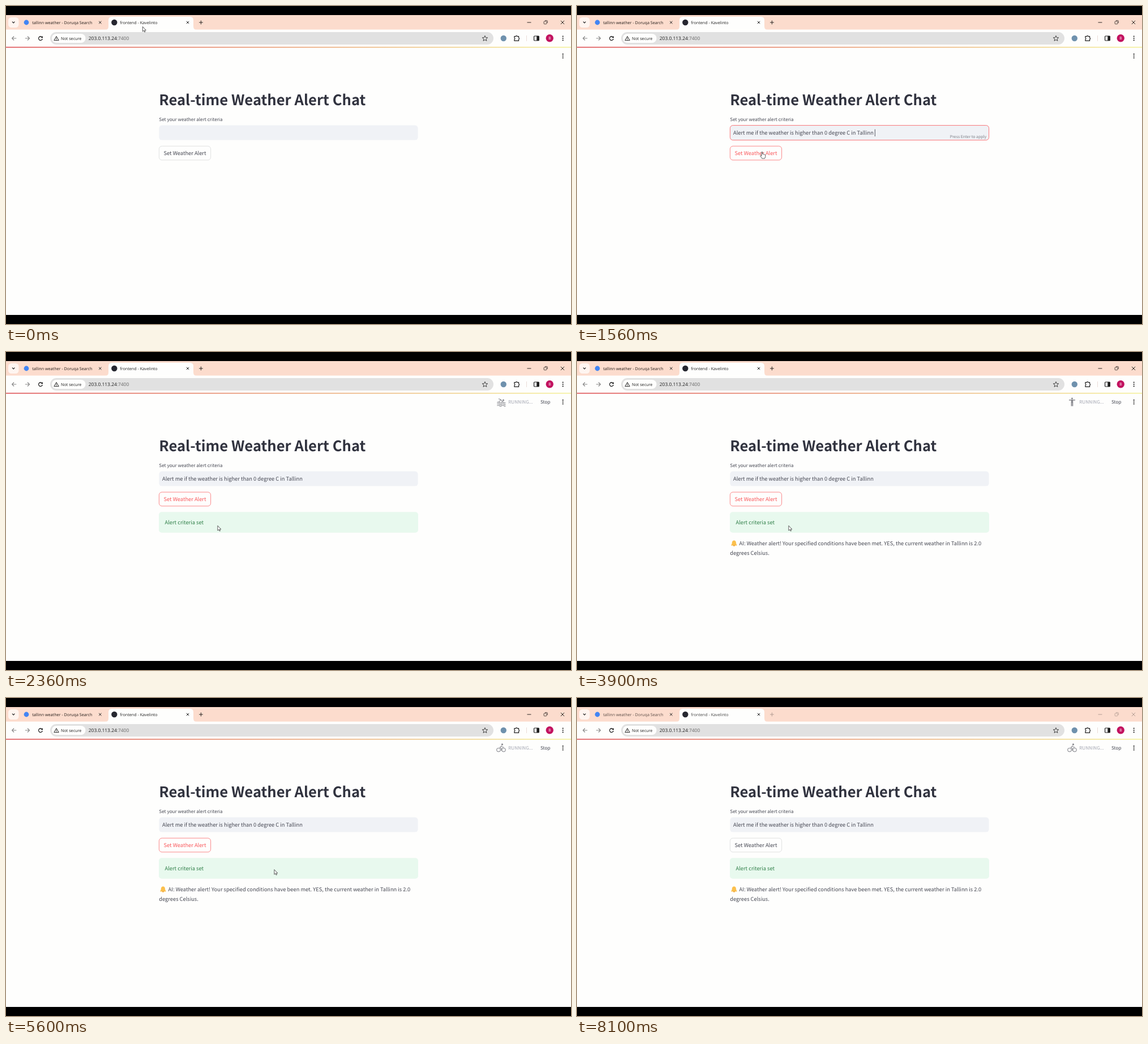
Recreate the animation shown at these times as an HTML page with a canvas. Size 998 by 561 pixels, loop 8160 ms.

```html
<!DOCTYPE html>
<html lang="en">
<head>
<meta charset="utf-8">
<title>Weather alert demo</title>
<style>
  html, body { margin: 0; width: 100%; height: 100%; overflow: hidden; background: #000; }
  canvas { display: block; width: 998px; height: 561px; }
</style>
</head>
<body>
<canvas id="stage" width="998" height="561"></canvas>
<script>
const ctx = document.getElementById('stage').getContext('2d');
const LOOP = 8160;
const UI = '"Open Sans", "Noto Sans", sans-serif';
const PAGE = '"Noto Sans CJK JP", "Noto Sans CJK SC", "Noto Sans CJK", "Noto Sans", sans-serif';
const INK = '#31333f', SOFT_INK = '#454752', RED = '#f9565a', WHITE = '#fefefd', DARK = '#1f1f1f';
const BODY = 9.31, SMALL = 8.14;

// Moments of the story, in ms
const AT = { focus: 660, paste: 900, press: 1660, release: 1730, alertSet: 1830,
             running: 1900, answer: 3600, blur: 6000 };

// Pointer keyframes: time, x, y
const POINTER = [[30, 241, 36], [640, 330, 223], [1160, 330, 223], [1500, 326, 257],
                 [1760, 326, 257], [2200, 373, 305], [2330, 373.5, 306],
                 [5050, 373.5, 306], [5600, 473.5, 302.3], [5900, 476, 304]];

// Activity pictograms in a 17 x 16 box: head centre, stroke path
const POSES = [
  { head: [9, 2], path: 'M8.5 5L7.5 10L10 12V16M7.5 10L5 16M8.5 5L5.5 7V9.5M8.5 5L10.5 7.5L13 8' },
  { head: [8.5, 2], path: 'M3 4.8H14M7.5 5V15.5M9.5 5V15.5M8.5 5V10' },
  { head: [11, 2], path: 'M9.5 5L7.8 10L10.5 12V16M7.8 10L6 13L2.5 12.5M9.5 5L5.5 5.5L4.5 8M9.5 5L11.5 8H14' },
  { head: [10.5, 1.9], path: 'M4 8.2a3.3 3.3 0 1 0 .01 0M13 8.2a3.3 3.3 0 1 0 .01 0M9 4.6L6.4 7.2L9 9V13M9 4.6L11 6.8H13.5', thin: true },
  { head: [9, 2], path: 'M8.5 5L7 9.5L12 11L14 14M8.5 5L11 8H14M3 7L15 15M2 13.5H7' },
  { head: [12.5, 5], path: 'M4 2.6L8 4L11 7.8M8 4L5 8M1.5 9.2q2-1.6 4 0t4 0t4 0t3 0M1.5 12q2-1.6 4 0t4 0t4 0t3 0M1.5 14.8q2-1.6 4 0t4 0t4 0t3 0', thin: true }
];

ctx.textRendering = 'geometricPrecision';

function rect(x, y, w, h, color) {
  ctx.fillStyle = color;
  ctx.fillRect(x, y, w, h);
}

function box(x, y, w, h, r, fill, stroke, line = 0.8) {
  ctx.beginPath();
  ctx.roundRect(x, y, w, h, r);
  if (fill) { ctx.fillStyle = fill; ctx.fill(); }
  if (stroke) { ctx.strokeStyle = stroke; ctx.lineWidth = line; ctx.stroke(); }
}

function dot(x, y, r, color) {
  ctx.fillStyle = color;
  ctx.beginPath();
  ctx.arc(x, y, r, 0, Math.PI * 2);
  ctx.fill();
}

function shape(d, x, y, { fill, stroke, line = 1 }) {
  const path = new Path2D(d);
  ctx.save();
  ctx.translate(x, y);
  ctx.lineWidth = line;
  if (fill) { ctx.fillStyle = fill; ctx.fill(path); }
  if (stroke) { ctx.strokeStyle = stroke; ctx.stroke(path); }
  ctx.restore();
}

function text(str, x, y, size, color, { family = PAGE, weight = 400, align = 'left' } = {}) {
  ctx.font = `${weight} ${size}px ${family}`;
  ctx.textAlign = align;
  ctx.fillStyle = color;
  ctx.fillText(str, x, y);
  return ctx.measureText(str).width;
}

function cross(x, y, r, color) {
  shape(`M${-r} ${-r}L${r} ${r}M${r} ${-r}L${-r} ${r}`, x, y, { stroke: color });
}

function moreDots(x, y, gap) {
  for (const i of [-1, 0, 1]) dot(x, y + i * gap, 1.05, DARK);
}

function drawTabs(blurred) {
  const control = blurred ? '#b39d93' : '#2b2523';
  rect(0, 16, 998, 26, '#fcdccd');
  box(4, 20, 18.5, 18, 5.5, '#fff5f0');
  shape('M-2.2 -1L0 1.2L2.2 -1', 13.2, 28.7, { stroke: DARK, line: 1.2 });

  dot(36, 29, 4.4, '#4285f4');
  text('tallinn weather - Doruqa Search', 46.3, 31.9, 7.2, blurred ? '#5b4c46' : '#231b18', { family: UI });
  cross(166.3, 29, 2.2, DARK);

  shape('M-6 23Q0 23 0 17V6Q0 0 6 0H144Q150 0 150 6V17Q150 23 156 23Z', 181, 19, { fill: WHITE });
  dot(191.3, 29, 5.2, '#262730');
  text('frontend - Kavelinto', 201.3, 31.9, 7.2, blurred ? '#444' : '#222', { family: UI });
  cross(321, 29, 2.2, DARK);

  shape('M-3.4 0H3.4M0 -3.4V3.4', 344.4, 29, { stroke: control });
  shape('M-3.5 0H3.5', 924, 29, { stroke: control });
  box(950.1, 27, 4.8, 4.8, 1, null, control);
  shape('M-1.5 -3H2Q3 -3 3 -2V1.5', 953.4, 28.6, { stroke: control, line: 0.8 });
  cross(983, 29, 3.1, control);
}

function drawToolbar(hover) {
  rect(0, 41.6, 998, 31, WHITE);
  const arrow = 'M4 0H-3.6M-.2 -3.5L-3.7 0L-.2 3.5';
  shape(arrow, 14.3, 57, { stroke: '#858585', line: 1.1 });
  ctx.save();
  ctx.translate(37.8, 57);
  ctx.scale(-1, 1);
  shape(arrow, 0, 0, { stroke: '#858585', line: 1.1 });
  ctx.restore();
  shape('M2.8 -1.8A3.4 3.4 0 1 0 3.3 1', 61, 57, { stroke: DARK, line: 1.3 });
  shape('M4 -4V-.7H.7Z', 61, 57, { fill: DARK });

  box(78, 46, 783, 22, 11, hover ? '#d7d7d7' : '#e1e1e1');
  box(81, 49, 59.5, 16, 8, WHITE);
  shape('M0 -3.8L4.2 3.4H-4.2ZM0 -1.4V1M0 1.7V2.6', 89, 57.2, { stroke: DARK, line: 0.95 });
  text('Not secure', 97, 59.6, 7.2, DARK, { family: UI, weight: 500 });
  const host = text('203.0.113.24', 145.8, 60.3, 8.42, DARK, { family: UI });
  text(':7400', 145.8 + host, 60.3, 8.42, '#666', { family: UI });

  let star = '';
  for (let i = 0; i < 10; i++) {
    const a = -Math.PI / 2 + i * Math.PI / 5, r = i % 2 ? 2.2 : 5;
    star += `${i ? 'L' : 'M'}${r * Math.cos(a)} ${r * Math.sin(a)}`;
  }
  shape(star + 'Z', 846, 57.4, { stroke: '#333', line: 0.9 });

  dot(878.8, 57, 5.2, '#6f91ad');
  shape('M-4 -3.4H-1.6A1.5 1.5 0 0 1 1.2 -3.4H3.6V-1A1.5 1.5 0 0 1 3.6 1.8V4.4H-4V2A1.5 1.5 0 0 0 -4 -.8Z',
    902, 57, { stroke: DARK, line: 1.2 });
  rect(919, 52, 0.8, 10, '#e5d5cd');
  box(932.6, 53, 8.8, 8, 1, null, DARK, 1.2);
  rect(937.3, 53, 4.2, 8, DARK);
  dot(960.3, 56.8, 6.7, '#c2125f');
  text('B', 960.3, 59.2, 6.6, '#fff', { family: UI, align: 'center' });
  moreDots(983.7, 57, 3.4);
}

function poseIndex(t) {
  const k = Math.floor((t - 100) / 200);
  if (t >= 6860 && k < 35) return 4;
  return (t >= 6860 ? k - 1 : k) % 6;
}

function drawStatus(t) {
  const { head, path, thin } = POSES[poseIndex(t)];
  const grey = '#898a90';
  dot(866 + head[0], 80 + head[1], 1.6, grey);
  shape(path, 866, 80, { stroke: grey, line: thin ? 1.1 : 1.6 });
  text('RUNNING...', 887.2, 91.2, SMALL, '#a3a6b2');
  text('Stop', 944, 91.2, SMALL, SOFT_INK);
}

function drawBell() {
  shape('M0 -5.2C-2.8 -5.2 -3.5 -3 -3.7 -.2Q-3.9 1.6 -5 2.6V3.6H5V2.6Q3.9 1.6 3.7 -.2C3.5 -3 2.8 -5.2 0 -5.2Z',
    277.4, 337.8, { fill: '#fbc04d' });
  dot(277.4, 341.6, 1.3, '#eda53a');
}

function drawPage(t) {
  rect(0, 72, 998, 473, WHITE);
  const stripe = ctx.createLinearGradient(0, 0, 998, 0);
  stripe.addColorStop(0, '#e05a5e');
  stripe.addColorStop(1, '#f5f2a0');
  rect(0, 71.9, 998, 1.7, stripe);
  moreDots(983.7, 88.2, 3.3);
  if (t >= AT.running) drawStatus(t);

  text('Real-time Weather Alert Chat', 270.3, 175, 25.62, INK, { weight: 700 });
  text('Set your weather alert criteria', 270.3, 203.4, SMALL, SOFT_INK);

  const focused = t >= AT.focus && t < AT.press;
  const pasted = t >= AT.paste;
  box(270.4, 210.6, 457.2, 26, 5, '#f0f2f6', focused ? RED : null);
  const query = 'Alert me if the weather is higher than 0 degree C in Tallinn ';
  const width = pasted ? text(query, 276, 227.4, BODY, SOFT_INK) : 0;
  if (focused) rect(276 + width, 217.5, 0.8, 12.5, INK);
  if (focused && pasted) {
    text('Press Enter to apply', 723.2, 233.2, 6.98, 'rgba(49,51,63,.6)', { align: 'right' });
  }

  const pressed = t >= AT.press && t < AT.release;
  const hot = t >= 1420 && t < AT.blur;
  box(270.4, 247.2, 91.2, 24.6, 5, pressed ? RED : WHITE, hot ? RED : 'rgba(49,51,63,.2)', 0.7);
  text('Set Weather Alert', 278.5, 263.1, BODY, pressed ? '#fff' : hot ? RED : SOFT_INK);

  if (t >= AT.alertSet) {
    box(270, 282.2, 458, 36.6, 5, '#e8f9ee');
    text('Alert criteria set', 280.5, 304.2, BODY, '#2f7f48');
  }
  if (t >= AT.answer) {
    drawBell();
    text('AI: Weather alert! Your specified conditions have been met. YES, the current weather in Tallinn is 2.0',
      286.6, 341.2, BODY, SOFT_INK);
    text('degrees Celsius.', 270.3, 357.8, BODY, SOFT_INK);
  }
}

function pointerAt(t) {
  let prev = POINTER[0];
  for (const next of POINTER) {
    if (t < next[0]) {
      const u = Math.max(0, (t - prev[0]) / (next[0] - prev[0] || 1));
      const e = u * u * (3 - 2 * u);
      return [1, 2].map(i => prev[i] + (next[i] - prev[i]) * e);
    }
    prev = next;
  }
  return prev.slice(1);
}

function inside(x, y, left, top, right, bottom) {
  return x >= left && x <= right && y >= top && y <= bottom;
}

function drawPointer(x, y) {
  if (inside(x, y, 270, 247, 362, 272)) {
    shape('M0 .8Q1 -.4 1.8 .8V4.2Q3 3.6 3.6 4.6Q5 4.2 5.3 5.2Q6.8 5 6.8 6.5V8.4Q6.6 10 5.5 12H.8Q-.5 9.8 -2.4 7.6Q-2 6 0 7.6Z',
      x, y, { fill: '#fff', stroke: '#333', line: 0.8 });
  } else if (inside(x, y, 270, 210, 728, 237) || inside(x, y, 141, 46, 838, 68)) {
    shape('M-1.8 -5H1.8M0 -5V5M-1.8 5H1.8', x, y, { stroke: '#222', line: 0.9 });
  } else {
    shape('M.4 .4V9L2.4 7.2L3.7 10L5 9.4L3.8 6.7H6.3Z', x, y, { fill: '#fff', stroke: '#333', line: 0.8 });
  }
}

function draw(t) {
  const [x, y] = pointerAt(t);
  rect(0, 0, 998, 561, '#000');
  drawTabs(t >= AT.blur);
  drawToolbar(inside(x, y, 78, 46, 861, 68));
  drawPage(t);
  if (t < AT.blur) drawPointer(x, y);
}

function frame() {
  draw(performance.now() % LOOP);
  requestAnimationFrame(frame);
}
frame();
</script>
</body>
</html>
```
